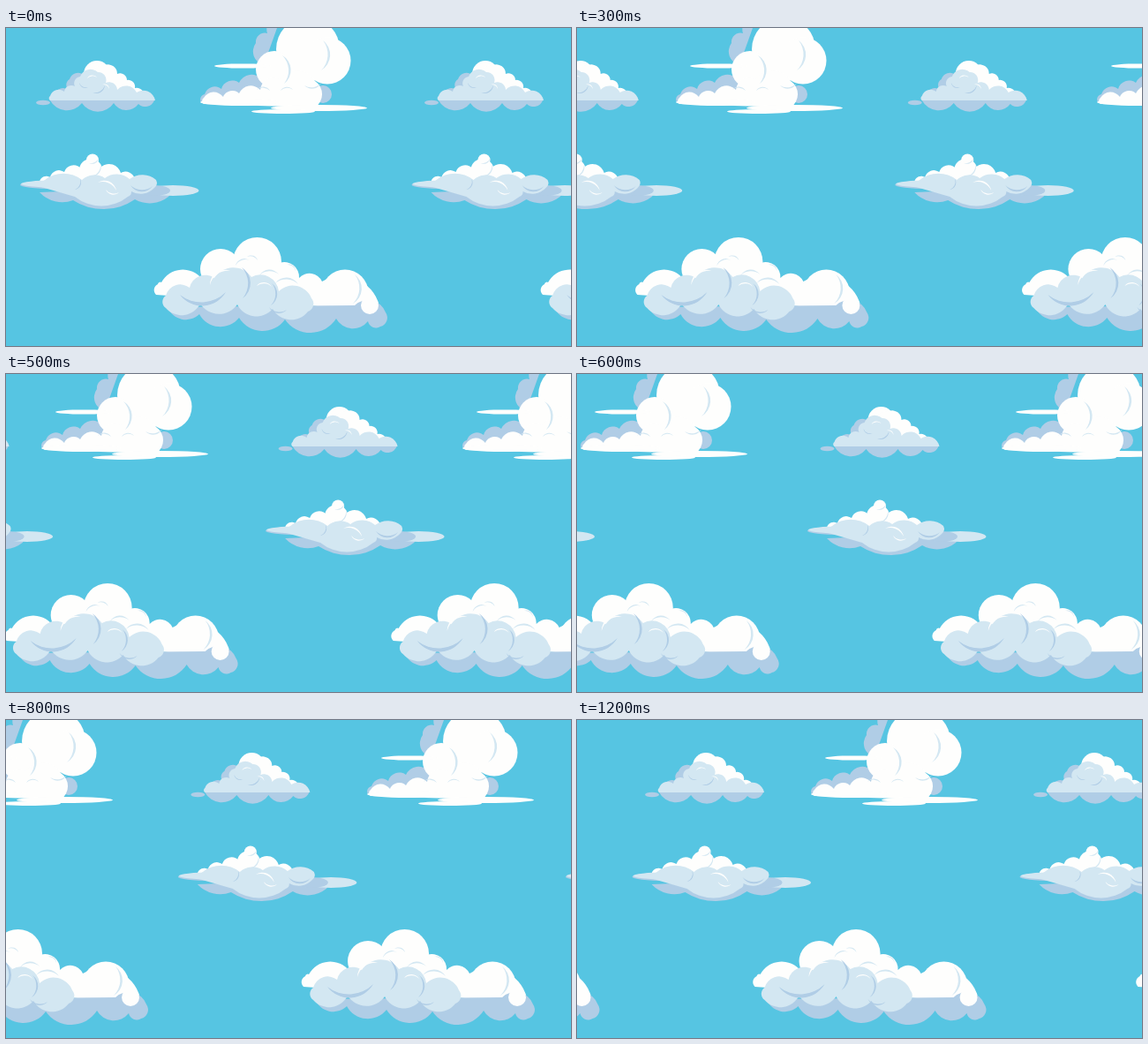
Recreate the animation shown at these times as an HTML page with a canvas. Size 640 by 360 pixels, loop 1300 ms.

```html
<!DOCTYPE html>
<html>
<head>
<meta charset="utf-8">
<title>Drifting clouds</title>
<style>
  html, body { margin: 0; width: 100%; height: 100%; overflow: hidden; background: #56c5e2; }
  canvas { display: block; }
</style>
</head>
<body>
<canvas id="stage" width="640" height="360"></canvas>
<script>
const ctx = document.getElementById('stage').getContext('2d');
const SKY = '#56c5e2', WHITE = '#fefefd', PALE = '#d3e7f2', BLUE = '#b0cde6';
const LOOP = 1300, STEP = 100;

function fill(color, path) {
  ctx.fillStyle = color;
  ctx.fill(new Path2D(path));
}

// Arc to a point; its radius is k times the chord, so a smaller k bulges more
function arc([x0, y0], [x1, y1], k, sweep = 1) {
  const r = k * Math.hypot(x1 - x0, y1 - y0);
  return `A${r} ${r} 0 0 ${sweep} ${x1} ${y1}`;
}

const parse = text => text.split(' ').map(p => p.split(',').map(Number));

// Clockwise outline with a round bump between neighbouring points
function bumps(color, text, k = .6) {
  const pts = parse(text);
  fill(color, 'M' + pts[0] + pts.slice(1).map((p, i) => arc(pts[i], p, k)).join('') + 'Z');
}

// Crescents, one for each pair of points
function curls(color, text) {
  const pts = parse(text);
  for (let i = 0; i < pts.length; i += 2) {
    const [a, b] = [pts[i], pts[i + 1]];
    fill(color, 'M' + a + arc(a, b, .6) + arc(b, a, .75, 0));
  }
}

function streak(color, left, right, y, ry) {
  ctx.fillStyle = color;
  ctx.beginPath();
  ctx.ellipse((left + right) / 2, y, (right - left) / 2, ry, 0, 0, 7);
  ctx.fill();
}

const ball = (color, x, y, r) => streak(color, x - r, x + r, y, r);

function tower() {
  bumps(BLUE, '292,42 283,17 296,6 312,-14');
  bumps(BLUE, '221,84 225,75 244,69 264,62 290,58 300,85');
  ball(BLUE, 359, 75, 10);
  ball(WHITE, 342, 24, 36);
  ball(WHITE, 364, 37, 26.5);
  ball(WHITE, 304, 47, 21);
  bumps(WHITE, '224,86 224,79 246,78 264,74 288,70 310,58 350,60 350,90');
  streak(WHITE, 236, 300, 43, 2.6);
  streak(WHITE, 220, 310, 84, 4);
  streak(WHITE, 300, 409, 90.5, 3.5);
  streak(WHITE, 278, 350, 94.5, 2.5);
  curls(PALE, '313,31 315,63 359,14 357,48 357,62 338,65 284,70 299,71 311,71 325,70');
}

function mound() {
  streak(BLUE, 34, 50, 84.5, 2.8);
  bumps(BLUE, '168,82 150,86 122,85 86,85 50,82 54,77 71,70 72,58 88,53');
  ball(WHITE, 103, 52, 15);
  bumps(WHITE, '90,76 112,42 126,52 137,59 146,68 156,77');
  bumps(PALE, '50,82 50,77 66,72 78,66 84,55 104,50 113,62 126,70 148,73 169,82');
  curls(WHITE, '92,57 103,56 109,64 117,69');
  curls(BLUE, '112,65 98,73 93,67 83,62');
}

function plate() {
  bumps(BLUE, '186,180 184,191 146,194 76,195 38,186', .9);
  streak(PALE, 160, 218.5, 184, 6);
  streak(BLUE, 150, 186, 184, 6);
  ball(WHITE, 98, 149.5, 7);
  ball(WHITE, 96, 161, 13);
  bumps(WHITE, '38,174 50,169 66,163 84,158 108,157 130,164 146,172');
  streak(BLUE, 16, 92, 177.5, 4.5);
  streak(PALE, 17, 92, 176.5, 4);
  bumps(PALE, '40,180 44,172 86,172 112,170 140,171 170,172 168,181 142,185 138,191 78,191', .8);
  curls(BLUE, '84,171 78,183 166,179 141,178');
  curls(PALE, '105,147 94,153 107,154 97,168');
  curls(WHITE, '104,175 125,184 128,186 113,183');
}

function bank() {
  bumps(WHITE, '170,302 172,290 176,288 222,284 258,258 310,266 332,283 358,287 424,320');
  ball(WHITE, 243, 273, 23);
  ball(WHITE, 284.5, 264.5, 27.5);
  ball(WHITE, 384, 300, 26.5);
  bumps(BLUE, '395,314 430,322 424,338 410,332 374,329 316,330 264,328 219,324 183,316');
  bumps(PALE, '181,317 181,303 208,294 236,283 278,282 309,298 346,306 342,321 '
    + '302,318 262,313 220,312 181,317');
  ball(WHITE, 412, 314, 10);
  curls(BLUE, '267,271 268,306 301,289 300,314 249,299 197,302 318,319 298,316');
  curls(WHITE, '231,291 254,275 284,292 301,293');
  curls(PALE, '395,279 393,312 260,269 276,263 273,259 285,263 287,280 309,279 '
    + '305,289 331,290 318,268 328,275');
}

// speed is pixels per step, copies are horizontal offsets at the loop start
const layers = [
  { draw: tower, speed: 36, copies: [0, 477] },
  { draw: mound, speed: 33.08, copies: [0, 440, 880] },
  { draw: plate, speed: 33.08, copies: [0, 443.5, 882.5] },
  { draw: bank, speed: 33.87, copies: [0, 438, 872] }
];

function render(now) {
  const tick = Math.floor(now % LOOP / STEP);
  ctx.fillStyle = SKY;
  ctx.fillRect(0, 0, 640, 360);
  for (const { draw, speed, copies } of layers) {
    for (const x of copies) {
      ctx.save();
      ctx.translate(x - speed * tick, 0);
      draw();
      ctx.restore();
    }
  }
}

const start = performance.now();
function loop() {
  render(performance.now() - start);
  requestAnimationFrame(loop);
}
loop();
</script>
</body>
</html>
```
